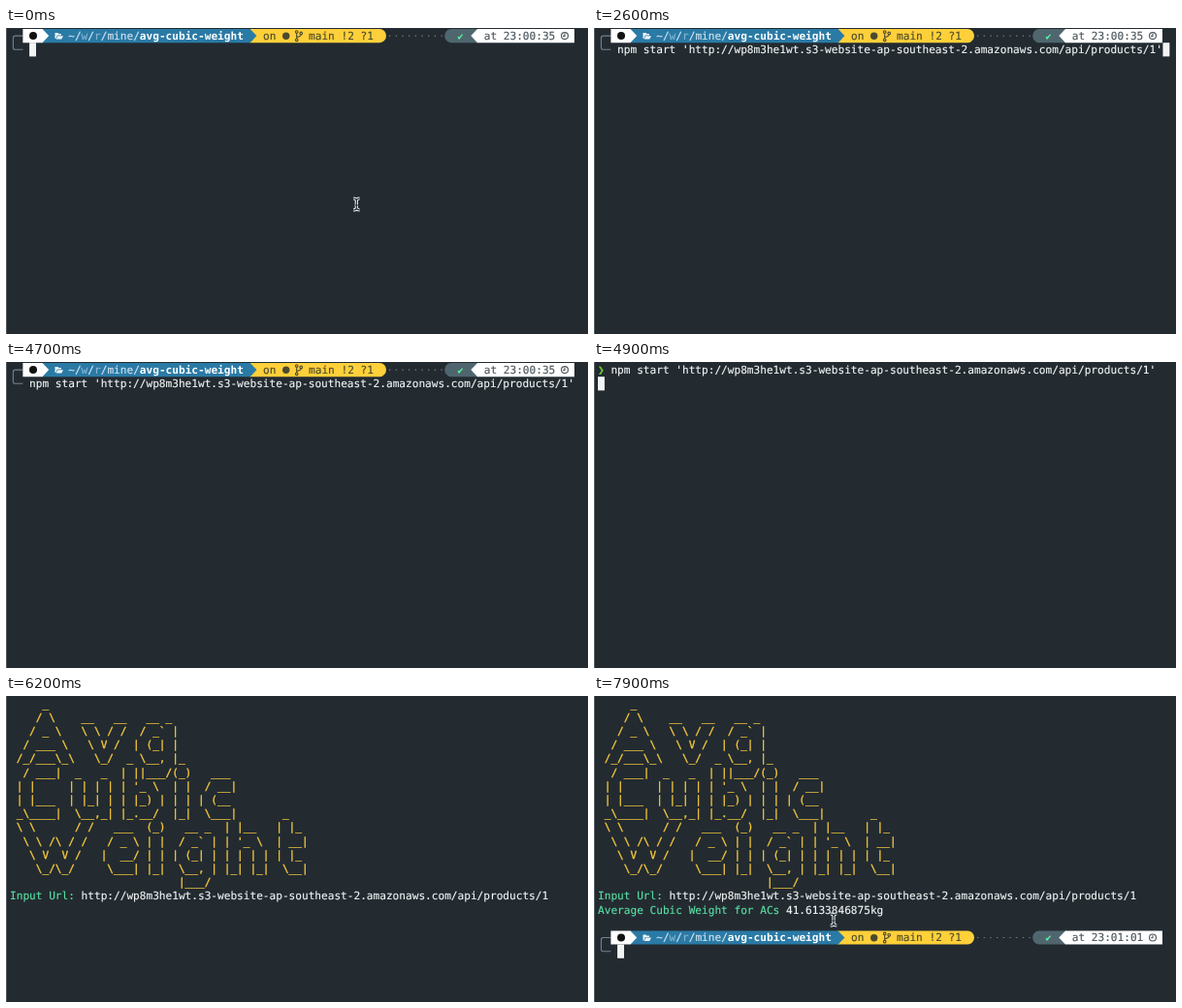
Recreate the animation shown at these times as an HTML page. Size 600 by 316 pixels, loop 8 s.

```html
<!DOCTYPE html>
<html>
<head>
<meta charset="utf-8">
<style>
html, body { margin: 0; height: 100%; overflow: hidden; background: #232b31; }
svg { display: block; }
text { font: 11.12px "DejaVu Sans Mono", "Liberation Mono", monospace; color: #f1f4f4; white-space: pre; text-rendering: geometricPrecision; }
text, tspan { fill: currentColor; stroke: currentColor; stroke-width: .15px; }
.bold { font-weight: bold; color: #fff; stroke: none; }
.path { color: #d3e4ee; }
.dim { color: #86b5d0; }
.git { color: #4b4a2e; }
.clock { color: #4b565c; }
.check { color: #5ff0a8; font-size: 10px; }
.green { color: #58dfa3; }
.under { color: #232b31; }
.hint { color: #9da4a7; }
.mark { color: #6fd32c; }
.line { fill: none; stroke-width: 1.1; }
#art text { color: #fbcb3c; stroke-width: .3px; }
</style>
</head>
<body>
<svg width="600" height="316" viewBox="0 0 600 316">
  <rect width="1" height="316" fill="#50575b"/>
  <g id="prompt">
    <path class="line" stroke="#75828a" d="M17.4 8.1H9.5Q7.4 8.1 7.4 10.2V20.2Q7.4 22.3 9.5 22.3H17.4"/>
    <path fill="#ffd03a" d="M251 1H385.2A6.8 7.1 0 0 1 385.2 15.2H251Z"/>
    <path fill="#2a7aa6" d="M37 1H251.7L258.4 8.1L251.7 15.2H37Z"/>
    <path fill="#fff" d="M17.4 1H37.5L44.2 8.1L37.5 15.2H17.4Z"/>
    <path fill="#50666f" d="M487 1H459A6.8 7.1 0 0 0 459 15.2H487Z"/>
    <path fill="#fff" d="M586 1H486L479.3 8.1L486 15.2H586Z"/>
    <circle cx="28" cy="8.1" r="4" fill="#111"/>
    <path fill="#eef5f9" d="M50.5 11V5H53.5L54.5 6H57V7.5H52.8L51.3 11ZM53.3 8.2H59L57.3 11.5H51.7Z"/>
    <circle cx="288.7" cy="8.3" r="3.7" fill="#4b4a2e"/>
    <g class="line" stroke="#4b4a2e">
      <circle cx="299.7" cy="4" r="1.3"/>
      <circle cx="299.7" cy="12.3" r="1.3"/>
      <circle cx="304.2" cy="5.4" r="1.3"/>
      <path d="M299.7 5.3V11M304.2 6.7Q304.2 8.5 299.7 9.5"/>
    </g>
    <path class="line" stroke="#7b888e" stroke-dasharray="1.2 5.495" d="M395 8.1H450"/>
    <g class="line" stroke="#4b565c">
      <circle cx="576" cy="8.1" r="3.5"/>
      <path d="M576 5.8V8.4H574.1"/>
    </g>
    <text class="path" x="64.2" y="11.5">~/<tspan class="dim">w</tspan>/<tspan class="dim">r</tspan>/mine/<tspan class="bold">avg-cubic-weight</tspan></text>
    <text class="git" x="265.1" y="11.5">on</text>
    <text class="git" x="312" y="11.5">main !2 ?1</text>
    <text class="check" x="465.5" y="11.5">✔</text>
    <text id="time" class="clock" x="492.7" y="11.5"></text>
  </g>
  <rect id="cursor" width="6.9" height="14.2" fill="#f2f4f4"/>
  <text id="cmd"><tspan id="typed"></tspan><tspan id="under" class="under"></tspan><tspan id="hint" class="hint"></tspan></text>
  <text id="mark" class="mark" x="4" y="11.5">❯</text>
  <g id="npm"></g>
  <g id="art"></g>
  <g id="input"></g>
  <g id="average"></g>
  <g id="mouse" fill="none"></g>
</svg>
<script type="text/plain" id="banner">
     _
    / \    __   __   __ _
   / _ \   \ \ / /  / _` |
  / ___ \   \ V /  | (_| |
 /_/___\_\   \_/  _ \__, |_
  / ___|  _   _  | ||___/(_)   ___
 | |     | | | | | '_ \  | |  / __|
 | |___  | |_| | | |_) | | | | (__
 _\____|  \__,_| |_.__/  |_|  \___|       _
 \ \      / /   ___  (_)   __ _  | |__   | |_
  \ \ /\ / /   / _ \ | |  / _` | | '_ \  | __|
   \ V  V /   |  __/ | | | (_| | | | | | | |_
    \_/\_/     \___| |_|  \__, | |_| |_|  \__|
                          |___/
</script>
<script>
const $ = id => document.getElementById(id);
const X = col => 4 + 6.695 * col;
const Y = row => 1 + 14.2 * row;
const baseline = row => Y(row) + 10.5;
const url = "http://wp8m3he1wt.s3-website-ap-southeast-2.amazonaws.com/api/products/1";
const command = `npm start '${url}'`;

// [start ms, column, row]; no column means hidden
const cursorSteps = [[0, 3, 1], [900, 4, 1], [1100, 5, 1], [2000, 87, 1], [4600],
  [4800, 0, 1], [5200, 0, 6], [6000], [6900, 3, 18]];

function add(parent, tag, attrs) {
  const node = document.createElementNS("http://www.w3.org/2000/svg", tag);
  for (const key in attrs) node.setAttribute(key, attrs[key]);
  parent.append(node);
  return node;
}

function print(id, row, lines) {
  lines.forEach((line, i) => {
    add($(id), "text", { x: X(0), y: baseline(row + i) }).innerHTML = line;
  });
}

function place(id, x, y) {
  $(id).setAttribute("transform", `translate(${x} ${y})`);
}

function show(id, on) {
  $(id).style.display = on ? "" : "none";
}

function draw(t) {
  const [, col, row] = cursorSteps.findLast(s => s[0] <= t);
  show("cursor", col !== undefined);
  if (col !== undefined) place("cursor", X(col), Y(row));

  const done = t >= 6900, entered = t >= 4800, cleared = t >= 6000;
  show("prompt", !entered || done);
  place("prompt", 0, done ? Y(17) - Y(0) : 0);
  $("time").textContent = done ? "at 23:01:01" : "at 23:00:35";

  const typed = t < 1100 ? 1 : t < 2000 ? 2 : command.length;
  $("typed").textContent = command.slice(0, typed);
  $("under").textContent = command.slice(typed, typed + 1);
  $("hint").textContent = command.slice(typed + 1);
  show("cmd", t >= 900 && !cleared);
  place("cmd", X(entered ? 2 : 3), baseline(entered ? 0 : 1));

  show("mark", entered && !cleared);
  show("npm", t >= 5200 && !cleared);
  show("art", cleared);
  show("input", cleared);
  show("average", done);

  show("mouse", t < 900 || t >= 7700);
  if (t < 900) place("mouse", 361.3, 182);
  else place("mouse", 247, 231);
}

const call = `&gt; tsc &amp;&amp; node dist/src/index.js "${url}"`;
const wrap = call.indexOf("om/api");
print("npm", 2, ["&gt; avg-cubic-weight@1.0.0 start", call.slice(0, wrap), call.slice(wrap)]);
print("art", 0, $("banner").textContent.split("\n").slice(1, -1));
print("input", 14, [`<tspan class="green">Input Url:</tspan> ${url}`]);
print("average", 15, [`<tspan class="green">Average Cubic Weight for ACs</tspan> 41.6133846875kg`]);

const beam = "M-3.2 -6Q0 -6 0 -3.6Q0 -6 3.2 -6M0 -4V4M-3.2 6Q0 6 0 3.6Q0 6 3.2 6M-1.7 1H1.7";
add($("mouse"), "path", { d: beam, stroke: "#f4f6f6", "stroke-width": 3.2 });
add($("mouse"), "path", { d: beam, stroke: "#20272c", "stroke-width": 1.2 });

function frame(now) {
  draw(now % 8000);
  requestAnimationFrame(frame);
}
draw(0);
requestAnimationFrame(frame);
</script>
</body>
</html>
```
